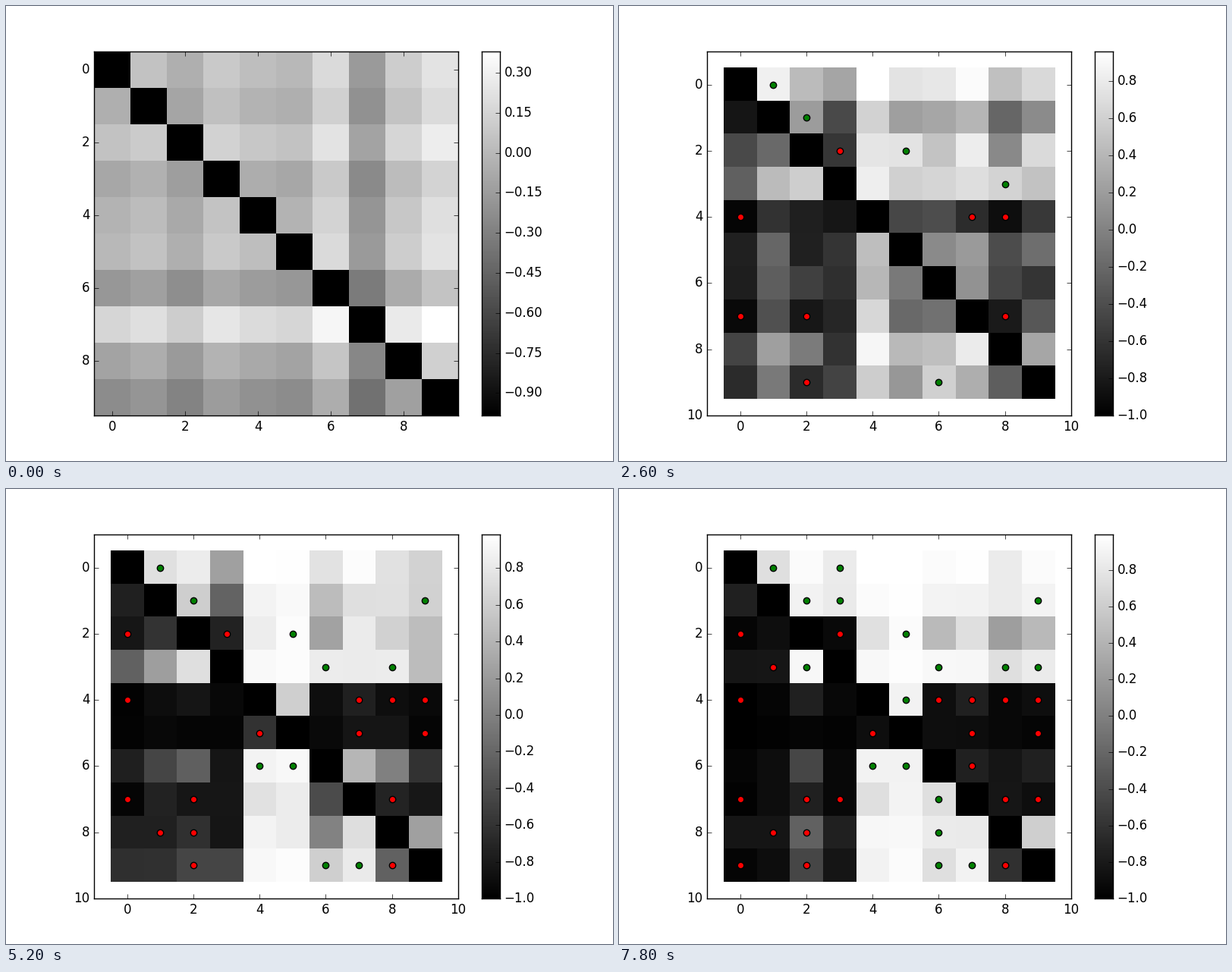
A matplotlib script that plays this animation: 800 px wide and 600 px high, repeating every 8 s.

```python
import numpy as np
import matplotlib.pyplot as plt
from matplotlib.animation import FuncAnimation
from matplotlib.ticker import MaxNLocator, MultipleLocator

FRAMES, STEP_MS = 40, 200
GAIN, BONUS, FADE = 0.24, 0.47, 12

# First guess of each item's score, and the true order from best to worst.
START = np.array([0.05, 0, 0.1, -0.04, 0.02, 0.05, -0.13, 0.21, -0.06, -0.19])
ORDER = [0, 1, 3, 2, 8, 9, 7, 6, 4, 5]

# Compared (row, column) pairs, one more per frame.
DUELS = [
    (4, 0), (2, 3), (3, 8), (4, 8), (7, 0), (1, 2), (7, 8), (9, 2),
    (7, 2), (0, 1), (9, 6), (4, 7), (2, 5), (8, 2), (1, 9), (9, 8),
    (9, 7), (5, 4), (8, 1), (5, 9), (6, 4), (5, 7), (2, 0), (3, 6),
    (6, 5), (4, 9), (1, 3), (8, 6), (6, 7), (3, 2), (9, 0), (4, 5),
    (7, 6), (0, 3), (7, 9), (3, 1), (4, 6), (7, 3), (3, 9)]


def row_wins(duel):
    return ORDER.index(duel[0]) < ORDER.index(duel[1])


def preferences(n):
    """Matrix after n duels: each moves both scores and its own pair."""
    score = START * np.exp(-n / FADE)
    pair = np.zeros((len(START), len(START)))
    for duel in DUELS[:n]:
        win, lose = duel if row_wins(duel) else duel[::-1]
        score[win] += GAIN
        score[lose] -= GAIN
        pair[win, lose] += BONUS
        pair[lose, win] -= BONUS
    m = np.tanh(score[:, None] - score + pair)
    np.fill_diagonal(m, -1 if n else -0.984)
    return m


plt.style.use("classic")
plt.rcParams["font.family"] = "DejaVu Sans"
fig = plt.figure(figsize=(8, 6), dpi=100, facecolor="white")

ax = fig.add_axes([0.145, 0.1, 0.6, 0.8])
grid = ax.imshow(preferences(0), cmap="gray", interpolation="nearest",
                 aspect="auto")
ax.xaxis.set_major_locator(MultipleLocator(2))
ax.yaxis.set_major_locator(MultipleLocator(2))
dot = dict(marker="o", ls="none", ms=6, mec="black", mew=1)
lost, = ax.plot([], [], color="red", **dot)
won, = ax.plot([], [], color="green", **dot)

cax = fig.add_axes([627 / 800, 0.1, 0.03, 0.8])
bar = cax.imshow(np.linspace(0, 1, 256)[:, None], cmap="gray",
                 origin="lower", interpolation="nearest", aspect="auto")
cax.set_xticks([])
cax.yaxis.tick_right()
cax.yaxis.set_major_locator(
    MaxNLocator(nbins=10, steps=[1, 1.5, 2, 2.5, 3, 4, 5, 6, 8, 10]))


def draw(n):
    m = preferences(n)
    low, high = m.min(), m.max()
    grid.set_data(m)
    grid.set_clim(low, high)

    # The view widens once there are dots to show.
    a, b = (-1, 10) if n else (-0.5, 9.5)
    ax.set_xlim(a, b)
    ax.set_ylim(b, a)
    for line, wins in ((lost, False), (won, True)):
        shown = [d for d in DUELS[:n] if row_wins(d) == wins]
        line.set_data([c for _, c in shown], [r for r, _ in shown])

    bar.set_extent((0, 1, low, high))
    cax.set_xlim(0, 1)
    cax.set_ylim(low, high)
    return grid, lost, won, bar


anim = FuncAnimation(fig, draw, frames=FRAMES, interval=STEP_MS,
                     init_func=lambda: draw(0), repeat=True,
                     repeat_delay=0, blit=False)
plt.show()
```
